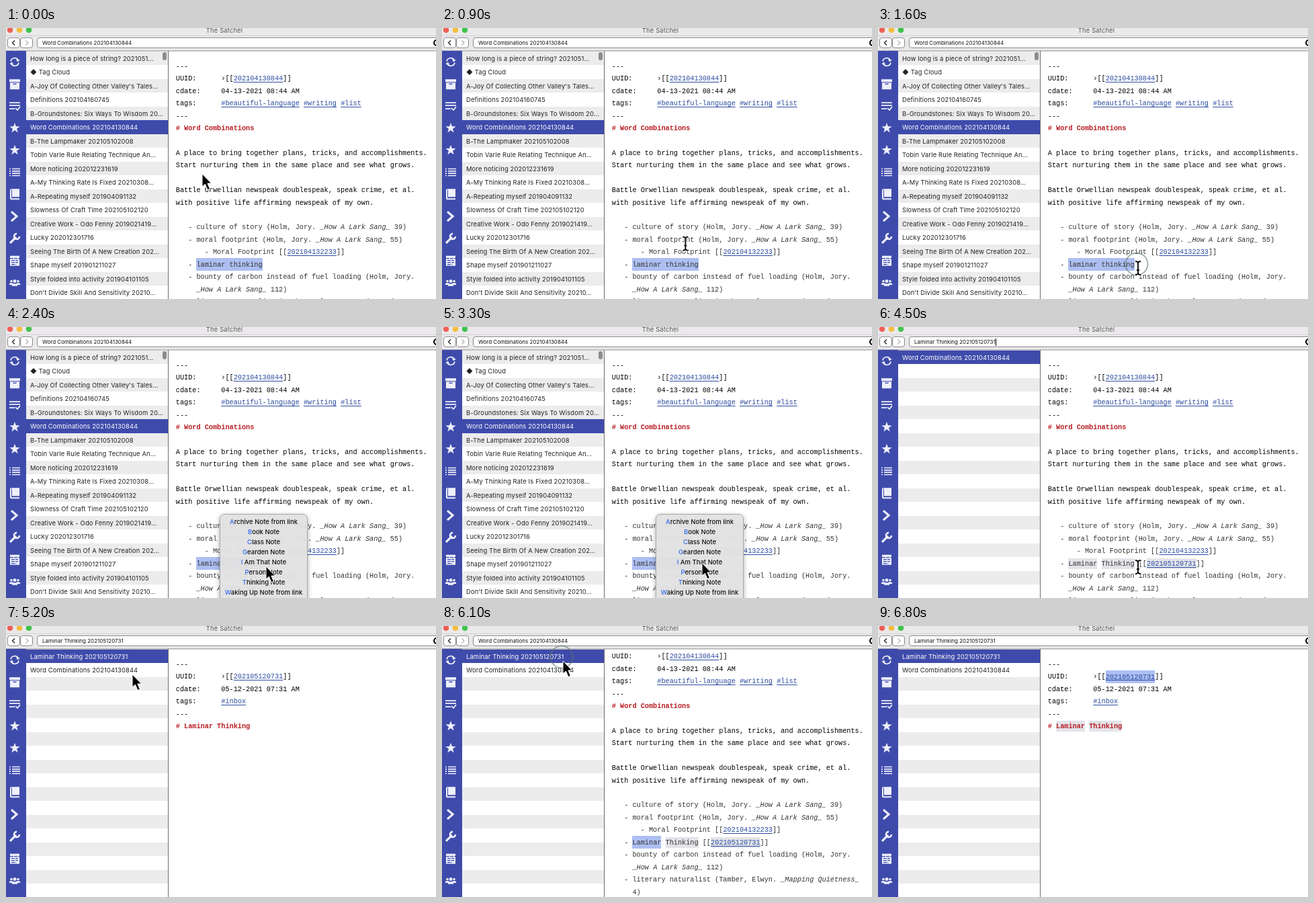
Write an HTML page that moves like this. It is 640 by 403 pixels and loops after 6.9 s.

```html
<!DOCTYPE html>
<html lang="en">
<head>
<meta charset="utf-8">
<title>Note taking</title>
<style>
html, body { margin: 0; width: 100%; height: 100%; overflow: hidden; background: #fff; }
#stage { position: relative; width: 640px; height: 403px; overflow: hidden; font-family: Inter, sans-serif; }
#stage > * { position: absolute; }
svg { left: 0; top: 0; }
#title { left: 0; width: 650px; top: -3px; font-size: 9.3px; line-height: 13px; letter-spacing: .2px; text-align: center; color: #555; }
#search { left: 54px; top: 15px; font-size: 8px; line-height: 14px; color: #111; white-space: pre; }
#search.typing { border-right: 1px solid #000; line-height: 11px; top: 16.5px; }
#list { left: 30px; top: 34.5px; width: 211px; height: 369px; font-size: 9.4px; letter-spacing: .14px; color: #222; }
#list div { height: 20.5px; line-height: 21px; padding-left: 6px; white-space: pre; }
#list div:nth-child(odd) { background: #ececec; }
#list div.on { background: #3f4bab; color: #fff; }
#knob { left: 233px; top: 36px; width: 6px; height: 12px; border-radius: 3px; background: #8c8c8c; }
#view { left: 242px; top: 35px; width: 398px; height: 368px; overflow: hidden; }
#note { position: absolute; left: 10.8px; font: 10.23px/18.43px "Liberation Mono", monospace; white-space: pre; color: #000; }
#note .item { color: #333; }
#note b { color: #b81c22; }
#note u { color: #2b4ba0; text-underline-offset: 1.5px; }
#note mark { color: inherit; background: #e3e4ea; padding: 2px 0; }
#note mark.sel { background: #adbff2; padding: 3.5px 0; }
#menu { left: 318px; top: 278px; width: 129px; height: 140px; padding-top: 3px; border: 1px solid #a9a9a9; border-radius: 7px;
  background: #e2e2e2f5; box-shadow: 0 2px 7px #0005; font-size: 9.5px; font-weight: 500; line-height: 15px; text-align: center; color: #111; }
#menu div::first-letter { color: #2f68ea; }
</style>
</head>
<body>
<div id="stage">
  <svg id="chrome" width="640" height="403"></svg>
  <div id="title">The Satchel</div>
  <div id="search"></div>
  <div id="list"></div>
  <div id="knob"></div>
  <div id="view"><div id="note"></div></div>
  <div id="menu"></div>
  <svg width="640" height="403" fill="none">
    <circle id="ring" r="16.5" stroke="#5b7562" stroke-opacity=".55" stroke-width="2"/>
    <path id="arrow" d="M0 0V19L4.4 15.2L8 23.6L11.4 22.2L7.9 14H13.6Z" fill="#000" stroke="#fff"/>
    <g id="beam">
      <path d="M-4-10Q0-10 0-7Q0-10 4-10M0-8V8M-4 10Q0 10 0 7Q0 10 4 10M-2 3H2" stroke="#fff" stroke-width="4"/>
      <path d="M-4-10Q0-10 0-7Q0-10 4-10M0-8V8M-4 10Q0 10 0 7Q0 10 4 10M-2 3H2" stroke="#000" stroke-width="1.8"/>
    </g>
  </svg>
</div>
<script>
const LOOP = 6900, STEP = 100, ROW = 18.43;
const $ = id => document.getElementById(id);

const WORD = 'Word Combinations 202104130844';
const LAMINAR = 'Laminar Thinking 202105120731';
const ALL = `How long is a piece of string? 2021051…
◆ Tag Cloud
A-Joy Of Collecting Other Valley's Tales…
Definitions 202104160745
B-Groundstones: Six Ways To Wisdom 20…
${WORD}
B-The Lampmaker 202105102008
Tobin Varle Rule Relating Technique An…
More noticing 202012231619
A-My Thinking Rate Is Fixed 20210308…
A-Repeating myself 201904091132
Slowness Of Craft Time 202105102120
Creative Work - Odo Fenny 2019021419…
Lucky 202012301716
Seeing The Birth Of A New Creation 202…
Shape myself 201901211027
Style folded into activity 201904101105
Don't Divide Skill And Sensitivity 20210…`.split('\n');
const MENU = ['Archive Note from link', 'Book Note', 'Class Note', 'Gearden Note', 'I Am That Note',
  'Person Note', 'Thinking Note', 'Waking Up Note from link'];

// {x} marks a search hit, <x> marks a selection
const head = (id, date, tags, title) => `---
UUID:      ›[[${id}]]
cdate:     ${date}
tags:      ${tags}
---
# ${title}`;
const wordNote = item => `${head('202104130844', '04-13-2021 08:44 AM', '#beautiful-language #writing #list', 'Word Combinations')}

A place to bring together plans, tricks, and accomplishments.
Start nurturing them in the same place and see what grows.

Battle Orwellian newspeak doublespeak, speak crime, et al.
with positive life affirming newspeak of my own.

   - culture of story (Holm, Jory. _How A Lark Sang_ 39)
   - moral footprint (Holm, Jory. _How A Lark Sang_ 55)
       - Moral Footprint [[202104132233]]
   - ${item}
   - bounty of carbon instead of fuel loading (Holm, Jory.
     _How A Lark Sang_ 112)
   - literary naturalist (Tamber, Elwyn. _Mapping Quietness_
     4)`;
const newNote = (id, title) => head(id, '05-12-2021 07:31 AM', '#inbox', title);
const NOTES = {
  before: wordNote('<laminar thinking>'),
  linked: wordNote('{Laminar} {Thinking} [[{202105120731}]]'),
  revisit: wordNote('<Laminar> {Thinking} [[{202105120731}]]'),
  fresh: newNote('202105120731', 'Laminar Thinking'),
  found: newNote('<202105120731>', '{Laminar} {Thinking}')
};

function markup(line) {
  const html = line
    .replace(/<(.+?)>/g, '\u0001$1\u0002').replace(/{(.+?)}/g, '\u0003$1\u0002')
    .replace(/\[\[(.+?)\]\]/g, '[[<u>$1</u>]]')
    .replace(/#[a-z-]+/g, '<u>$&</u>')
    .replace(/_.+_/, '<i>$&</i>')
    .replace(/\u0001/g, '<mark class="sel">').replace(/\u0003/g, '<mark>').replace(/\u0002/g, '</mark>');
  if (line.startsWith('# ')) return `<b>${html}</b>`;
  return line.startsWith('   ') ? `<span class="item">${html}</span>` : html;
}

// [start, search text, list, selected row, note, scroll]
const SCENES = [
  [0, WORD, ALL, 5, 'before', 0],
  [3900, WORD, ALL, 5, 'linked', 0],
  [4200, LAMINAR, [WORD], 0, 'linked', 0],
  [4800, LAMINAR, [LAMINAR, WORD], 0, 'fresh', 0],
  [5500, WORD, [LAMINAR, WORD], 1, 'revisit', 30],
  [6100, WORD, [LAMINAR, WORD], 0, 'revisit', 30],
  [6200, LAMINAR, [LAMINAR, WORD], 0, 'found', 0]
];
// [time, x, y]
const PATH = [[0, 292, 217], [300, 292, 217], [1200, 387, 357], [2300, 387, 357], [2700, 387, 351], [3500, 387, 351],
  [3700, 387, 357], [4700, 387, 357], [5200, 188, 72], [5600, 188, 70], [6000, 180, 52], [6300, 180, 52], [6750, 670, 110]];

const within = (t, a, b) => t >= a && t < b;
const show = (id, on) => $(id).style.display = on ? '' : 'none';

function pointer(t) {
  const i = PATH.findIndex(p => p[0] > t);
  if (i < 0) return PATH.at(-1).slice(1);
  const [a, b] = [PATH[i - 1], PATH[i]];
  const k = (t - a[0]) / (b[0] - a[0]), e = k * k * (3 - 2 * k);
  return [a[1] + (b[1] - a[1]) * e, a[2] + (b[2] - a[2]) * e];
}

function drawScene([start, search, rows, selected, note, scroll]) {
  $('search').textContent = search;
  $('search').className = start === 4200 ? 'typing' : '';
  $('list').innerHTML = Array.from({ length: 18 }, (_, i) =>
    `<div${i === selected ? ' class="on"' : ''}>${rows[i] || ''}</div>`).join('');
  $('note').innerHTML = NOTES[note].split('\n').map(markup).join('\n');
  $('note').style.top = 57 - 35 - ROW / 2 - scroll + 'px';
  show('knob', rows === ALL);
}

function drawChrome() {
  const box = (x, w) => `<rect x="${x}" y="14.5" width="${w}" height="15" rx="3.5" fill="#fff" stroke="#8b8b8b"/>`;
  const light = (x, c) => `<circle cx="${x}" cy="3" r="4.3" fill="${c}"/>`;
  const bars = [-5, -1.7, 1.7, 5];
  const star = Array.from({ length: 10 }, (_, i) => {
    const r = i % 2 ? 3.2 : 8, a = i * Math.PI / 5;
    return [r * Math.sin(a), -r * Math.cos(a)].map(v => v.toFixed(1));
  }).join(' ');
  const line = (d, w = 1.7) => `<path d="${d}" fill="none" stroke="#eef0fb" stroke-width="${w}"/>`;
  const fill = d => `<path d="${d}"/>`;
  const starIcon = `<polygon points="${star}"/>`;
  const person = (x, y, r) => `<circle cx="${x}" cy="${y}" r="${r}"/><path d="M${x - r * 1.7} ${y + r * 3}v-1q0-${r} ${r * 1.7}-${r}t${r * 1.7} ${r}v1z"/>`;
  const icons = [
    line('M-6-1A6 6 0 0 1 5-3M6 1A6 6 0 0 1-5 3') + fill('M8-3L4 0L2-4ZM-8 3L-4 0L-2 4Z'),
    fill('M-8-7H8V-3H-8ZM-7-2H7V8H-7Z') + '<path d="M-2.5 0h5" stroke="#3f4bab" stroke-width="1.5"/>',
    line('M-8-5H8M-8-1H8M-8 4H0M1 3L4 6L8 1'),
    starIcon, starIcon,
    line(bars.map(y => `M-8 ${y}h2M-4 ${y}H8`).join('')),
    fill('M-7-6Q-7-8-5-8H7V4H-5V6H7V8H-5Q-7 8-7 6Z') + '<path d="M-4.5-7V4" stroke="#3f4bab"/>',
    line('M-5-7L3 0L-5 7', 3.2),
    line('M-7 7L2-2', 3.2) + line('M3-7A4 4 0 1 0 7-3', 2.6),
    fill('M-7-7H7V8H-7Z') + '<path d="M-7-3H7M-5 0H5M-5 3H5M-5 6H2" stroke="#3f4bab" stroke-width="1.3" stroke-dasharray="5 1"/>',
    person(-5, -2, 1.8) + person(5, -2, 1.8) + person(0, -2, 2.4)
  ];
  $('chrome').innerHTML = `<rect width="640" height="34" fill="#ebe9eb"/>
    ${light(6, '#ee6058')}${light(20, '#f5bd3e')}${light(34, '#3fc24c')}
    <path d="M0 11.5H640" stroke="#d4d2d4"/>
    ${box(2.5, 18)}${box(21.5, 18)}${box(46.5, 610)}
    <path d="M13 18.5L9.5 22L13 25.5" fill="none" stroke="#222" stroke-width="1.3"/>
    <path d="M29.5 18.5L33 22L29.5 25.5" fill="none" stroke="#aaa" stroke-width="1.2"/>
    <circle cx="641" cy="22" r="4" fill="none" stroke="#000" stroke-width="2"/>
    <path d="M0 34H640" stroke="#8f8f8f"/>
    <rect y="34" width="30" height="369" fill="#3f4bab"/>
    <path d="M241.5 34V403" stroke="#6d6d6d"/>
    <g fill="#eef0fb">${icons.map((s, i) => `<g transform="translate(13 ${50.5 + i * 32.8})">${s}</g>`).join('')}</g>`;
}

let current;
function frame(now) {
  const t = Math.floor(now % LOOP / STEP) * STEP;
  const scene = SCENES.findLast(s => s[0] <= t);
  if (scene !== current) drawScene(current = scene);
  const [x, y] = pointer(t), beam = within(t, 900, 2400) || within(t, 3600, 4800);
  show('menu', within(t, 2400, 3600));
  show('beam', beam);
  show('arrow', !beam);
  show('ring', within(t, 1400, 1800) || within(t, 5400, 5600) || within(t, 6000, 6300));
  $(beam ? 'beam' : 'arrow').setAttribute('transform', `translate(${x} ${y})`);
  $('ring').setAttribute('transform', `translate(${x - 2} ${y - 6})`);
  requestAnimationFrame(frame);
}

drawChrome();
$('menu').innerHTML = MENU.map(m => `<div>${m}</div>`).join('');
const begin = performance.now();
requestAnimationFrame(function tick() {
  frame(Math.max(0, performance.now() - begin));
});
</script>
</body>
</html>
```
